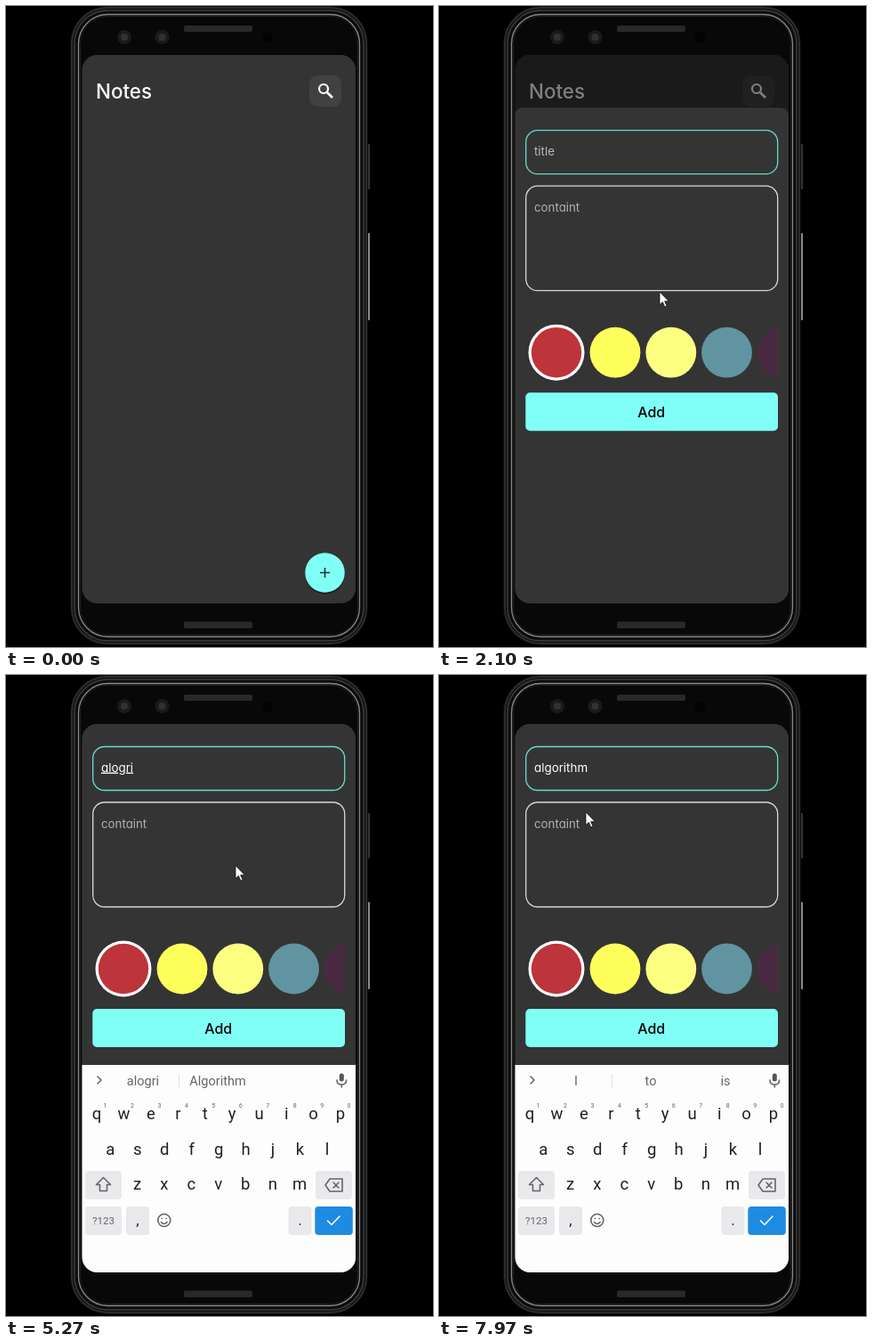
Write an HTML page that moves like this. It is 480 px wide and 720 px high and loops after 8000 ms.

```html
<!DOCTYPE html>
<html lang="en">
<head>
<meta charset="utf-8">
<style>
  html, body { margin: 0; width: 100%; height: 100%; overflow: hidden; background: #000; }
  svg { display: block; }
  text { font-family: Inter, sans-serif; font-feature-settings: "cv11"; }
  .keys text { font-family: Roboto, sans-serif; text-anchor: middle; fill: #202022; }
  .keys .soft { fill: #66666a; }
  .line { fill: none; stroke: #66666a; stroke-width: 1.6; stroke-linecap: round; stroke-linejoin: round; }
</style>
</head>
<body>
<svg id="stage" width="480" height="720" viewBox="0 0 480 720"></svg>
<script>
const LOOP = 8000, BG = '#343434', BORDER = '#d9d7dc', AQUA = '#80fff6';

const rect = (x, y, w, h, r, fill, extra = '') =>
  `<rect x="${x}" y="${y}" width="${w}" height="${h}" rx="${r}" fill="${fill}" ${extra}/>`;
const circle = (x, y, r, fill, extra = '') =>
  `<circle cx="${x}" cy="${y}" r="${r}" fill="${fill}" ${extra}/>`;
const text = (x, y, size, content, extra = '') =>
  `<text x="${x}" y="${y}" font-size="${size}" ${extra}>${content}</text>`;
const line = (d, extra = '') => `<path class="line" d="${d}" ${extra}/>`;

function phone() {
  const ring = (inset, r, color, width) =>
    rect(73 + inset, 1 + inset, 333 - 2 * inset, 716 - 2 * inset, r, 'none',
      `stroke="${color}" stroke-width="${width}"`);
  return rect(406, 155, 3, 51, 1, '#343434') + rect(406.5, 255, 2.5, 98, 1, '#8c8c86') +
    rect(72, 0, 335, 718, 42, '#0c0c0c') +
    ring(1, 40, '#2c2c2c', 2) + ring(4, 37, '#3e3e3e', 1.5) +
    ring(8.5, 33, '#888888', 1.3) + ring(10.5, 31, '#1e1e1e', 1) +
    rect(84.5, 12.5, 310, 693, 29, '#080808') +
    rect(200, 22, 77, 7, 2, '#29292b') + rect(200, 691.5, 77, 7.5, 2, '#29292b') +
    [133, 175.5].map(x => circle(x, 35, 8, '#1a1a1c') + circle(x, 35, 4, '#303036')).join('') +
    rect(288, 30, 11, 11, 4, '#030303');
}

function home() {
  return rect(85, 55, 308, 616, 0, BG) +
    text(101, 103.5, 22.4, 'Notes', 'fill="#fff" font-weight="500"') +
    rect(341, 78, 36, 35, 9, '#414141') +
    `<path d="M361 97l6 6" stroke="#fff" stroke-width="2.6"/>` +
    circle(357, 93, 5, 'none', 'stroke="#fff" stroke-width="2.2"') +
    circle(358.5, 638, 22.5, '#1c1c1c') + circle(358.5, 636.5, 22.3, AQUA) +
    `<path d="M353 636.5h11M358.5 631v11" stroke="#1c3434" stroke-width="1.6"/>`;
}

// Laid out with the top of the title box at y = 0.
function sheet() {
  const colors = [[198, '#ffff5c'], [260.8, '#fcff80'], [323.5, '#5f94a0'], [386, '#4a2a42']];
  return rect(85, -25, 308, 660, 9, BG) +
    rect(97.7, 0.5, 283, 49, 13, 'none', 'id="titleBox" stroke-width="1.3"') +
    rect(97.7, 63, 283, 117.5, 13, 'none', `stroke="${BORDER}" stroke-width="1.3"`) +
    text(107, 28.5, 13.3, 'title', 'id="hint" fill="#b8b8b8"') +
    text(107, 91.5, 13.3, 'containt', 'fill="#b0b0b0"') +
    text(107, 28.5, 13.4, '', 'id="typed" fill="#fff"') +
    rect(0, 16, 1.6, 17, 0, AQUA, 'id="caret"') +
    circle(132, 250, 31.5, '#fff') + circle(132, 250, 28.2, '#bd343a') +
    `<g clip-path="url(#row)">${colors.map(([x, c]) => circle(x, 250, 28.4, c)).join('')}</g>` +
    rect(97.3, 295, 283.7, 43, 5, AQUA) +
    text(238.7, 322.5, 16, 'Add', 'fill="#000" font-weight="500" text-anchor="middle"');
}

function keyboard() {
  const row = (letters, x0, y) => [...letters].map((c, i) => text(x0 + 30.45 * i, y, 18.5, c)).join('');
  const key = (x, y, w, fill = '#e9e9ec') => rect(x, y, w, 32, 4, fill);
  const digits = [...'1234567890'].map((c, i) =>
    text(111.5 + 30.45 * i, 486, 7, c, 'class="soft"')).join('');
  const tools = `<g id="tools">` +
    line('M107 451l-4 4 4 4') + circle(144, 454, 4.2, 'none', 'class="line"') + line('M147.5 457.5l4.5 4.5') +
    line('M184 449h12v8l-4 4h-8zM192 461v-4h4M187 456q2.5 3 5 0M187.5 452.5h.2M192.5 452.5h.2') +
    text(233, 459, 11, 'GIF', 'class="soft" font-weight="700"') +
    line('M273 450h11v12h-11zM276 450v-2h5v2M276 454h5M276 456.5h5M276 459h3') +
    [328.5, 333.3, 338].map(x => circle(x, 455, 1.6, '#66666a')).join('') + `</g>`;
  const words = `<g id="words">` + line('M103 451l4 4-4 4') +
    `<path d="M194.5 448v16" stroke="#e2e2e4"/>` +
    [154, 238, 322].map(x => text(x, 461, 14.5, '', 'class="soft word"')).join('') + `</g>`;
  return rect(85, 438, 308, 240, 0, '#fdfdfd') + tools + words +
    rect(374.8, 447.5, 5, 9, 2.5, '#555558') + line('M372 455q0 5 5.3 5t5.3-5M377.3 460v3') +
    row('qwertyuiop', 102, 499) + digits + row('asdfghjkl', 117.3, 538.5) + row('zxcvbnm', 147.5, 578) +
    key(89, 557, 41) + key(348, 557, 41) +
    line('M109.5 564.5l-8 8h4v7h8v-7h4z') +
    line('M359 573l5-7h14v14h-14zM368 570l6 6M374 570l-6 6') +
    key(89, 597, 41) + key(135, 597, 26) + key(317.5, 597, 26) + key(347.3, 597, 42.5, '#1f8be0') +
    text(109.5, 617, 11.5, '?123', 'class="soft"') + text(148, 618, 17, ',') + text(330.5, 618, 17, '.') +
    circle(177.8, 612.5, 7, 'none', 'class="line"') +
    line('M174.5 614.5q3.3 4 6.6 0M175.2 610.5h.2M180.2 610.5h.2') +
    line('M361.5 613l4.5 4.5 9-9.5', 'style="stroke:#fff"');
}

const stage = document.getElementById('stage');
stage.innerHTML =
  `<defs><clipPath id="screen">${rect(85.5, 55, 307.7, 616, 17, '#fff')}</clipPath>
   <clipPath id="row">${rect(97, 210, 284, 80, 0, '#fff')}</clipPath></defs>` + phone() +
  `<g clip-path="url(#screen)">${home()}${rect(85, 55, 308, 616, 0, '#000', 'id="shade"')}
   <g id="sheet">${sheet()}</g><g id="keys" class="keys">${keyboard()}</g></g>
   <path id="pointer" d="M0 0v14.5l3.4-3 2.4 5.5 2.3-1-2.4-5.3h4.6z" fill="#fff" stroke="#111" stroke-width=".8"/>`;

const el = Object.fromEntries([...stage.querySelectorAll('[id]')].map(e => [e.id, e]));
const wordSlots = [...stage.querySelectorAll('.word')];

const typing = [
  [2150, ''], [2780, 'a'], [3080, 'al'], [3380, 'alo'], [3700, 'alog'], [4000, 'alogr'], [4300, 'alogri'],
  [5400, 'alogr'], [5600, 'alog'], [5860, 'alo'], [6020, 'al'], [6320, 'alg'], [6500, 'algo'],
  [6680, 'algor'], [6840, 'algori'], [7000, 'algorit'], [7120, 'algorith'], [7240, 'algorithm']
];
const COMMIT = 7350;
const suggestions = {
  a: ['a', 'and', 'at'], al: ['al', 'all', 'also'], alo: ['alo', 'along', 'alone'],
  alog: ['alog', 'along', 'slog'], alogr: ['alogr', 'Algorithm', ''], alogri: ['alogri', 'Algorithm', ''],
  alg: ['alg', 'algorithm', 'algae'], algo: ['algo', 'algorithm', 'also']
};
const path = [
  [900, 355, 640], [1080, 352, 632], [1270, 299, 465], [1600, 248, 325],
  [2100, 248, 321], [2500, 258, 214], [7560, 258, 214], [7920, 165, 154]
];

// The sheet is 383 px tall; the keyboard lifts it by its own height.
const SHEET_HEIGHT = 383, KEYBOARD_HEIGHT = 233, REST = 313;

const progress = (t, start, length) => Math.min(1, Math.max(0, (t - start) / length));
const easeOut = (p, power) => 1 - (1 - p) ** power;
const show = (e, on) => e.setAttribute('visibility', on ? 'inherit' : 'hidden');
const move = (e, x, y) => e.setAttribute('transform', `translate(${x} ${y})`);

function pointerAt(t) {
  const i = Math.max(0, path.findLastIndex(p => p[0] <= t));
  const [t0, x0, y0] = path[i], [t1, x1, y1] = path[i + 1] || path[i];
  const p = t1 > t0 ? progress(t, t0, t1 - t0) : 0, s = p * p * (3 - 2 * p);
  return [x0 + (x1 - x0) * s, y0 + (y1 - y0) * s];
}

function render(t) {
  const opening = progress(t, 1170, 250);
  const open = easeOut(opening, 3.02);
  const lift = easeOut(progress(t, 1980, 285), 2.48);
  move(el.sheet, 0, REST + SHEET_HEIGHT * (1 - open) - KEYBOARD_HEIGHT * lift);
  el.shade.setAttribute('opacity', 0.5 * easeOut(opening, 2.3));
  move(el.keys, 0, KEYBOARD_HEIGHT * (1 - easeOut(progress(t, 2110, 230), 2.5)));

  el.titleBox.setAttribute('stroke', t >= 1850 ? '#66dccb' : BORDER);

  const [since, value] = typing.findLast(k => k[0] <= t) || [0, ''];
  const committed = t >= COMMIT;
  el.typed.textContent = value;
  el.typed.setAttribute('text-decoration', committed || !value ? 'none' : 'underline');
  el.hint.setAttribute('opacity', 1 - progress(t, 2780, 120));
  const blinkStart = committed ? COMMIT : since;
  show(el.caret, since > 0 && Math.floor((t - blinkStart) / 500) % 2 === 0);
  el.caret.setAttribute('x', 107 + (value ? el.typed.getComputedTextLength() : 0));

  show(el.tools, t < 2900);
  show(el.words, t >= 2900);
  const words = committed ? ['I', 'to', 'is'] : suggestions[value] || [value, 'algorithm', 'algorithms'];
  wordSlots.forEach((slot, i) => slot.textContent = words[i]);

  show(el.pointer, t >= 900);
  move(el.pointer, ...pointerAt(t));
}

function frame(now) {
  render(now % LOOP);
  requestAnimationFrame(frame);
}
render(0);
requestAnimationFrame(frame);
</script>
</body>
</html>
```
